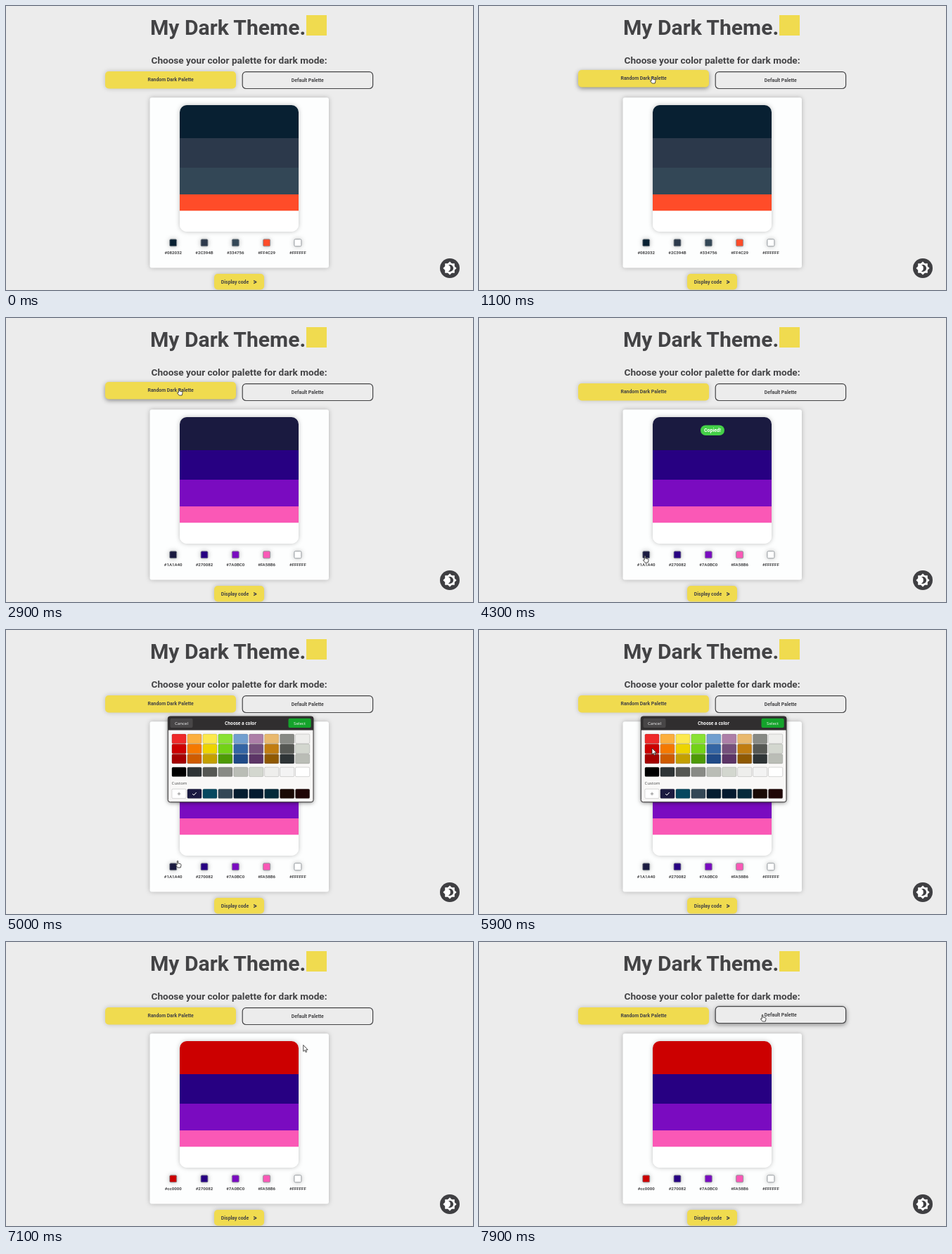
An HTML page for the animation above (8000 ms loop, 664x404 px).

```html
<!DOCTYPE html>
<html lang="en">
<head>
<meta charset="utf-8">
<title>Dark theme palette</title>
<style>
  html, body { margin: 0; width: 100%; height: 100%; overflow: hidden; background: #ececec; }
  svg { display: block; width: 664px; height: 404px; }
  text { font: 700 6.87px Roboto, sans-serif; fill: #434345; text-anchor: middle; }
  .label { font-size: 6.1px; }
  .gtk text { font: 400 6.1px "Noto Sans", sans-serif; fill: #eee; }
  .soft { filter: drop-shadow(0 0 3px rgba(0,0,0,.25)); }
  .dialog { filter: drop-shadow(0 1px 3px rgba(0,0,0,.5)); }
</style>
</head>
<body>
<svg viewBox="0 0 664 404">
  <text x="207" y="41" text-anchor="start" style="font-size:30.1px;text-anchor:start;transform:translateX(-2px)">My Dark Theme.</text>
  <rect x="427" y="13" width="29" height="29" fill="#f0db4f"/>
  <text x="331.5" y="82" style="font-size:13.6px">Choose your color palette for dark mode:</text>

  <g id="random">
    <rect x="141" y="93" width="186" height="24.5" rx="5" fill="#f0db4f"/>
    <text x="234.2" y="107.2">Random Dark Palette</text>
  </g>
  <g id="default">
    <rect x="336.2" y="93.7" width="185.4" height="23.8" rx="5" fill="#ececec" stroke="#434345" stroke-width="1.2"/>
    <text x="428.8" y="108">Default Palette</text>
  </g>

  <rect class="soft" x="204.5" y="130.3" width="254.5" height="242.2" rx="3" fill="#fdfefe"/>
  <rect class="soft" x="247" y="141" width="169" height="180" rx="10" fill="#fff"/>
  <clipPath id="rounded"><rect x="247" y="141" width="169" height="180" rx="10"/></clipPath>
  <g id="bands" clip-path="url(#rounded)"></g>
  <g id="swatches"></g>

  <g id="toast">
    <rect x="315" y="152.5" width="34" height="14.5" rx="7.2" fill="#44cf48"/>
    <text x="332" y="162.2" style="font-size:7px;fill:#fff">Copied!</text>
  </g>

  <g class="soft">
    <rect x="296" y="381" width="71" height="22.5" rx="5" fill="#f0db4f"/>
  </g>
  <text x="325.5" y="394.7">Display code</text>
  <text x="354" y="396" style="font-size:10px;font-weight:900">&gt;</text>

  <circle cx="631" cy="373" r="14" fill="#3f3f42"/>
  <path transform="translate(620.8 362.8) scale(.85)" fill="#fff" fill-rule="evenodd" d="M20 8.7V4h-4.7L12 .7 8.7 4H4v4.7L.7 12 4 15.3V20h4.7l3.3 3.3 3.3-3.3H20v-4.7l3.3-3.3zM12 18a6 6 0 0 1-2.5-.55 6 6 0 0 0 0-10.9A6 6 0 0 1 12 6a6 6 0 0 1 0 12z"/>

  <g id="dialog" class="gtk">
    <rect class="dialog" x="230.3" y="123" width="206.7" height="121.8" rx="3" fill="#f9f8f7"/>
    <path d="M230.3 142.5V126a3 3 0 0 1 3-3H434a3 3 0 0 1 3 3v16.5z" fill="#302e2f"/>
    <rect x="230.3" y="123" width="206.7" height="121.8" rx="3" fill="none" stroke="#302e2f"/>
    <rect x="233.5" y="125.8" width="32" height="13.2" rx="2" fill="#484647"/>
    <text x="249.5" y="134.6">Cancel</text>
    <text x="333.5" y="134.7" style="font-size:6.2px;font-weight:700;fill:#fff">Choose a color</text>
    <rect id="select" x="401.5" y="125.8" width="32.2" height="13.2" rx="2"/>
    <text x="417.5" y="134.6">Select</text>
    <text x="246.5" y="219.8" style="font-size:6px;fill:#555">Custom</text>
    <g id="cells"></g>
    <path d="M243.7 233h4.6M246 230.7v4.6" stroke="#777" stroke-width=".8"/>
    <path id="check" d="M-2.7 0l2 2 3.6-4" fill="none" stroke="#fff" stroke-width="1"/>
  </g>

  <g id="cursor" fill="#fff" stroke="#222" stroke-width=".8" stroke-linejoin="round">
    <path id="hand" d="M-.7.8Q0-.4.8.8V4l3.4.8Q5.4 5.2 5 6.6L4.2 10H.2L-2.4 6.8Q-2.8 5.4-.7 6.2z"/>
    <path id="arrow" d="M0 0V9L2.1 7.2 3.5 10.3 4.9 9.7 3.6 6.7H6.4z"/>
  </g>
</svg>
<script>
const $ = id => document.getElementById(id);
const rect = (x, y, w, h, fill, extra = '') =>
  `<rect x="${x}" y="${y}" width="${w}" height="${h}" fill="${fill}" ${extra}/>`;
const ramp = (t, from, to) => Math.min(1, Math.max(0, (t - from) / (to - from)));
const during = (t, from, to) => t >= from && t < to;
const show = (id, on) => $(id).style.display = on ? '' : 'none';

const palettes = [
  [0, '#082032 #2C394B #334756 #FF4C29'],
  [2000, '#000000 #3E065F #700B97 #8E05C2'],
  [2300, '#040303 #461111 #A13333 #B3541E'],
  [2900, '#1A1A40 #270082 #7A0BC0 #FA58B6'],
  [6800, '#cc0000 #270082 #7A0BC0 #FA58B6'],
].map(([start, colors]) => [start, (colors + ' #FFFFFF').split(' ')]);
const bandTops = [141, 188, 230, 268, 291.5, 321];

// Cursor moves: start, end, control point, end point
const moves = [
  [500, 1000, 450, 185, 246, 100],
  [3100, 3700, 480, 205, 236, 338],
  [4500, 4800, 240, 336, 244, 328],
  [5000, 5800, 265, 260, 246, 168],
  [6000, 6700, 335, 25, 420, 132],
  [6900, 7700, 432, 190, 403, 103],
];

// Color chooser grid: three shades per hue, then greys and custom colors
const rows = [
  [148, 'ef2929 fcaf3e fce94f 8ae234 729fcf ad7fa8 e9b96e 888a85 eeeeec'],
  [162.3, 'cc0000 f57900 edd400 73d216 3465a4 75507b c17d11 555753 d3d7cf'],
  [176.6, 'a40000 ce5c00 c4a000 4e9a06 204a87 5c3566 8f5902 2e3436 babdb6'],
  [195.2, '000000 2e3436 555753 888a85 babdb6 d3d7cf eeeeec f3f3f3 ffffff'],
  [226.2, 'ffffff 1a1a40 07485f 334756 051d30 041a2f 052a3a 190a05 1f0606'],
];
$('cells').innerHTML = rows.map(([y, colors]) => colors.split(' ').map((c, i) =>
  rect(235.9 + 21.95 * i, y, 20.2, 13.4, '#' + c, 'rx="1.5" stroke="#000" stroke-opacity=".25" stroke-width=".6"')
).join('')).join('');

function cursorAt(t) {
  let x = 611, y = 155;
  for (const [from, to, cx, cy, ex, ey] of moves) {
    if (t < from) break;
    const p = ramp(t, from, to), k = p * p * (3 - 2 * p), q = 1 - k;
    x = q * q * x + 2 * q * k * cx + k * k * ex;
    y = q * q * y + 2 * q * k * cy + k * k * ey;
  }
  return [x, y];
}

function lift(id, amount, glow) {
  $(id).setAttribute('transform', `translate(0 ${-2 * amount})`);
  $(id).firstElementChild.style.filter =
    `drop-shadow(0 ${2 * amount}px ${3}px rgba(0,0,0,${glow + (.42 - glow) * amount}))`;
}

let shownPalette;
function drawPalette(colors) {
  if (colors === shownPalette) return;
  shownPalette = colors;
  $('bands').innerHTML = colors.map((c, i) =>
    rect(247, bandTops[i], 169, bandTops[i + 1] - bandTops[i], c)).join('');
  $('swatches').innerHTML = colors.map((c, i) => {
    const x = 237.7 + 44.3 * i;
    return rect(x - 5, 331.8, 10, 10, c, 'rx="1.5" stroke="#8d9298" stroke-width=".9" class="soft"') +
      `<text class="label" x="${x}" y="352.5">${c}</text>`;
  }).join('');
}

function draw(t) {
  drawPalette(palettes.filter(([start]) => t >= start).pop()[1]);
  lift('random', ramp(t, 800, 1000) - ramp(t, 3100, 3300), .2);
  lift('default', ramp(t, 7600, 7800), 0);
  $('toast').style.opacity = ramp(t, 3900, 4200) - ramp(t, 4500, 4800);

  show('dialog', during(t, 5000, 6900));
  const pressed = t >= 6800;
  $('select').setAttribute('fill', pressed ? '#0b6318' : '#14a32b');
  $('select').setAttribute('stroke', pressed ? '#d8e8d8' : 'none');
  $('check').setAttribute('transform', t < 6000 ? 'translate(267.8 233)' : 'translate(246 169)');

  const hand = during(t, 900, 3200) || during(t, 3700, 5100) || t >= 7600;
  show('cursor', t >= 500);
  show('hand', hand);
  show('arrow', !hand);
  $('cursor').setAttribute('transform', `translate(${cursorAt(t)})`);
}

function tick() {
  draw(Math.floor(performance.now() % 8000 / 100) * 100);
  requestAnimationFrame(tick);
}
tick();
</script>
</body>
</html>
```
